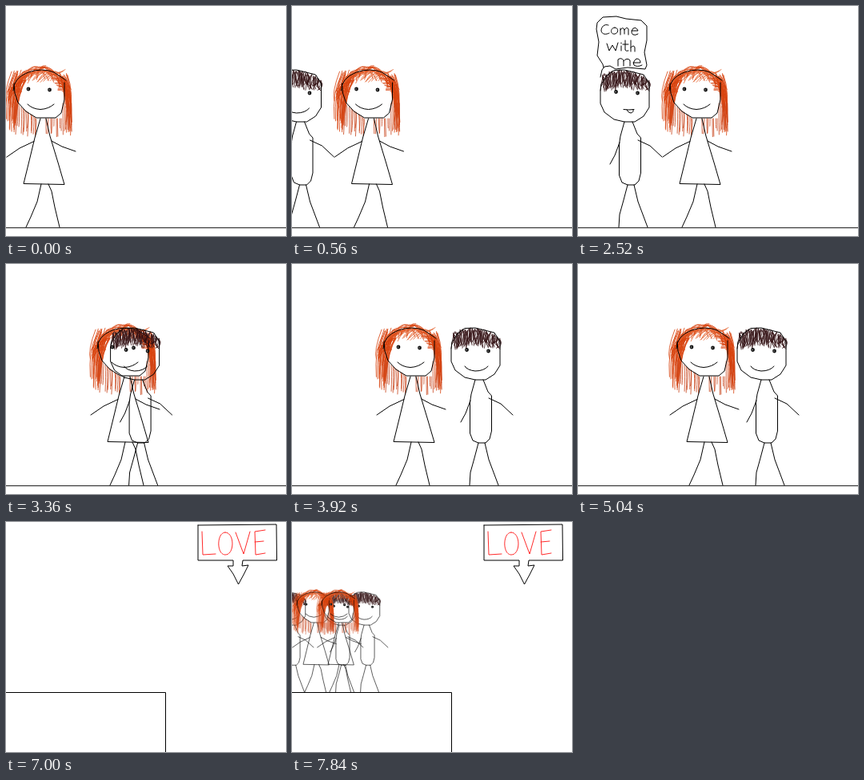
Recreate the animation shown at these times as an HTML page with a canvas. Size 350 px wide and 288 px high, loop 8 s.

```html
<!DOCTYPE html>
<html lang="en">
<head>
<meta charset="utf-8">
<title>Come with me</title>
<style>
  html, body { margin: 0; width: 100%; height: 100%; overflow: hidden; background: #fff; }
  canvas { display: block; }
</style>
</head>
<body>
<canvas id="stage" width="350" height="288"></canvas>
<script>
const ctx = document.getElementById('stage').getContext('2d');
const LOOP = 8000, STEP = 280;

let seed = 7;
const rnd = (a, b) => {
  seed = (seed * 16807) % 2147483647;
  return a + (b - a) * seed / 2147483647;
};

// Collects random pen strokes: make() returns [x0, y0, cx, cy, x1, y1]
function scribble(count, make) {
  const path = new Path2D();
  for (let i = 0; i < count; i++) {
    const [x0, y0, cx, cy, x1, y1] = make(i / (count - 1));
    path.moveTo(x0, y0);
    path.quadraticCurveTo(cx, cy, x1, y1);
  }
  return path;
}

const girlHair = [
  // crown
  ['#d9430f', scribble(80, u => {
    const a = Math.PI * (1.04 + .9 * u), r = rnd(.8, 1);
    const x = 42 + 37 * r * Math.cos(a), y = 112 + 37 * r * Math.sin(a);
    const lean = x < 44 ? -1 : 1;
    return [x - lean * 7, y - 1, x + lean * 2, y - 3, x + lean * rnd(2, 9), y + rnd(5, 14)];
  })],
  // left lock
  ['#d9430f', scribble(30, () => {
    const x = rnd(7, 26);
    return [x, rnd(80, 96), x - 10, 108, x * .6 - 4 + rnd(-1, 2), rnd(118, 158)];
  })],
  // fringe swept over the forehead
  ['#e4622f', scribble(20, u => {
    const x = 16 + 46 * u;
    return [x + 12, rnd(79, 84), x + 2, 84, x - rnd(2, 7), rnd(90, 97)];
  })],
  // right lock
  ['#d9430f', scribble(25, () => {
    const x = rnd(66, 77);
    return [x, rnd(84, 96), x + 8, 108, rnd(73, 83), rnd(122, 163)];
  })],
  // strands below the face
  ['#c8431a', scribble(15, u => {
    const x = 11 + 27 * u + rnd(-1, 1);
    return [x, 120 + (x - 10) * .75, x + 1, 140, x + rnd(-1, 1), rnd(148, 163)];
  })],
  ['#c8431a', scribble(14, u => {
    const x = 50 + 32 * u + rnd(-1, 1);
    return [x, x < 70 ? 141 : 122, x, 150, x + rnd(-1, 1), rnd(150, 164)];
  })]
];

const boyHair = [['#321012', scribble(95, u => {
  const x = 30 + 58 * u, top = 80 + Math.abs(x - 54) ** 2 / 90;
  return [x + rnd(-2, 3), top + rnd(0, 4), x + rnd(-6, 7), top + 8,
    Math.max(28, Math.min(89, x + rnd(-5, 4))), rnd(95, 104) + Math.abs(x - 58) / 8];
})]];

const girlBody = new Path2D(`
  M9 106Q9 90 28 83Q45 77 60 83L75 93M10 97L11 109L15 121L25 132L38 140H62L69 134L73 117L73 96
  M27 123Q33 129 43 129.500Q53 129 60 123
  M43 141L36 165L29 194L22 222.500L73 223.500L65 196L55 163L50 141
  M35 169.500L17 178L1 189M57 169L70 176L87 182
  M44 223L39 245L31 264L25 277M53 223L57 232L61 252L67 277`);

const boyBody = new Path2D(`
  M36 87L29 98L28 106V122L33 133L45 142L58 145H71L82 138L89 127V97L82 86L70 83L58 80L45 80.500L36 87
  M58 145L53 163L51.500 173V212L55 221L62 224H71L76 219L78.500 209V165L74 160L68 145
  M52 171L46 187L40 198M75 168L90 175L105 189
  M62 224L57 243L52 261L51 277M70 224L75 245L87 277`);

const smile = new Path2D('M45 128Q48 133 58 134Q69 134 74 128');
const talk = new Path2D('M57 129.500L63 130L70 129.500M61 130Q63 134 66 134Q70 133 69 130');

const bubble = new Path2D(`
  M28 89L30 80L33 76L40 75L47 79L62 77L84 79L86 74L83 58L86 43L86 25L79 18L60 16L48 13L31 14L24 21L23 29L26 45L24 62L31 73L32 77
  M38 24C33 22 29 26 29 31C30 36 35 36 39 34M46 27C40 27 40 36 46 35C51 34 51 27 46 27
  M53 36V28M53 30Q56 25 58 30V35M58 30Q61 25 63 29V36M67 31H75Q73 26 69 28Q65 33 69 36Q72 37 75 35
  M36 47L39 56L43 49L47 56L50 46M54 50V56M54 46V47M59 43V55Q60 57 63 56M56 48H63M66 43V57M66 52Q70 48 71 52V57
  M50 75V67Q54 64 57 68V75M57 69Q61 64 65 68V75M69 71H78Q78 66 73 66Q68 70 70 74Q74 77 80 74`);

const sign = new Path2D(`
  M240 4L338 3L338.500 48H296L295 55L303 54L297 66L290.500 78L284 65L277 55H284V48H240V4`);
const love = new Path2D(`
  M245 12L246 41L262 40M274 13C263 13 263 41 274 41C286 41 286 13 274 13
  M287 13L297 40L305 12M324 10L311 12L312 41L324 39M311 25L322 24`);

function line(path, color = '#000') {
  ctx.strokeStyle = color;
  ctx.stroke(path);
}

function eye(x, y) {
  ctx.fillStyle = '#111';
  ctx.beginPath();
  ctx.arc(x, y, 2.4, 0, 7);
  ctx.fill();
  ctx.fillStyle = '#fff';
  ctx.fillRect(x - 1, y - .5, 1, 1);
}

function figure(x, hair, body, eyes, mouth) {
  ctx.save();
  ctx.translate(x, 0);
  ctx.lineWidth = .8;
  for (const [color, path] of hair) line(path, color);
  ctx.lineWidth = 1;
  line(body);
  if (mouth) line(mouth);
  for (const [ex, ey] of eyes) eye(ex, ey);
  ctx.restore();
}

const girl = x => figure(x, girlHair, girlBody, [[28, 104], [54.5, 105]]);
const boy = (x, mouth = smile) => figure(x, boyHair, boyBody, [[47.5, 107.5], [74.500, 109]], mouth);

const clamp = (v, lo, hi) => Math.max(lo, Math.min(hi, v));
const steps = (n, from, to) => clamp(n - from, 0, to - from);

function meadow(n) {
  ctx.fillStyle = '#444';
  ctx.fillRect(0, 277, 350, 1.3);
  const arrive = (steps(n, 0, 4) - 4) * 26.25;
  const leave = steps(n, 19, 24) * 32.75;
  const talking = n >= 5 && n <= 9;
  girl(105 + arrive + (n >= 17 ? 9 : 0) + leave);
  boy(arrive + steps(n, 9, 14) * 34.2 + leave, talking && n % 2 ? talk : smile);
  if (talking) line(bubble);
}

function cliff(n) {
  ctx.strokeStyle = '#000';
  ctx.strokeRect(-1.5, 213.5, 201, 80);
  line(sign);
  line(love, '#ff2a2a');
  // each step leaves the earlier drawing behind
  for (const x of [-62, 0, 31].slice(0, n - 25)) {
    ctx.save();
    ctx.translate(x, 37);
    ctx.scale(.635, .635);
    boy(35);
    girl(0);
    ctx.restore();
  }
}

function draw(now) {
  const n = Math.floor((now % LOOP) / STEP);
  ctx.fillStyle = '#fff';
  ctx.fillRect(0, 0, 350, 288);
  ctx.lineWidth = 1;
  ctx.lineJoin = ctx.lineCap = 'round';
  if (n < 25) meadow(n);
  else cliff(n);
}

const start = performance.now();
function tick() {
  draw(performance.now() - start);
  requestAnimationFrame(tick);
}
tick();
</script>
</body>
</html>
```
